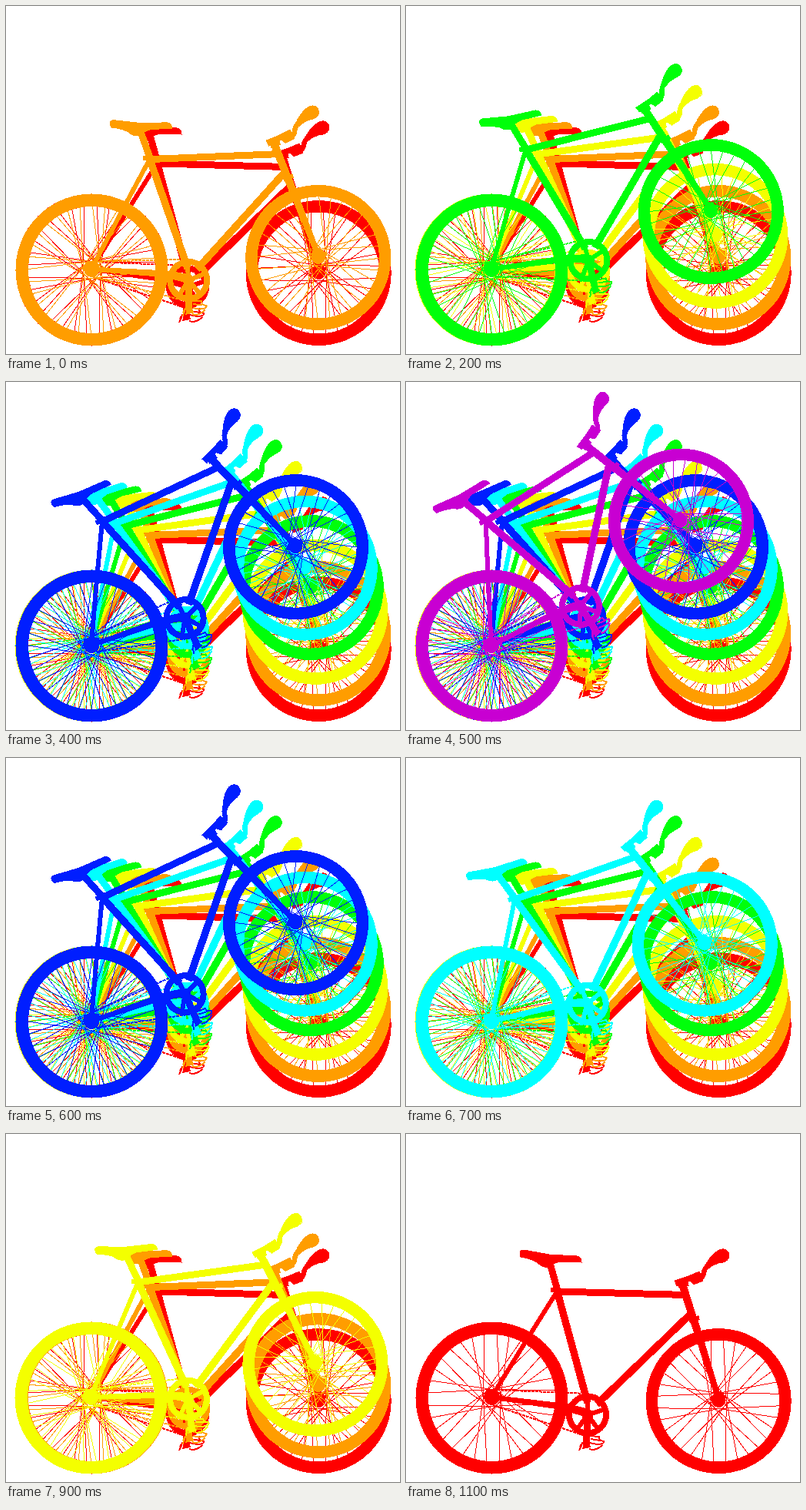
An HTML page for the animation above (1.2 s loop, 512x453 px).

```html
<!DOCTYPE html>
<html lang="en">
<head>
<meta charset="utf-8">
<title>Rainbow wheelie</title>
<style>
  html, body { margin: 0; width: 100%; height: 100%; overflow: hidden; background: #fff; }
  svg { display: block; width: 100%; height: 100%; }
  #bike { fill: none; stroke: currentColor; }
  .solid { fill: currentColor; stroke-width: 1; }
</style>
</head>
<body>
<svg viewBox="0 0 512 453" shape-rendering="crispEdges">
  <defs>
    <g id="bike">
      <g id="wheels"></g>

      <!-- saddle and seat post -->
      <path class="solid" d="M148 155Q148 151 153 151L186 157L222 159Q228 160 228 167L201 166Q191 168 188 172Q181 175 175 171Q167 163 149 160Z"/>
      <path stroke-width="9" d="M187 168L197 204"/>
      <path stroke-width="6" d="M188 203L203 204"/>

      <!-- frame -->
      <path stroke-width="9.5" d="M196 203L236 350M369 235L248 352"/>
      <path stroke-width="9" d="M197 205L364 209.5"/>
      <path stroke-width="6" d="M195 207L160 263L112 341"/>
      <path class="solid" d="M111 340L212 352L236 358V369L205 359L111 345Z"/>

      <!-- head tube and fork -->
      <path stroke-width="10" d="M359 195L374 243"/>
      <path stroke-width="6" d="M354 198L367 195M368 243L381 239"/>
      <path class="solid" d="M369 242L378 239L410 346L404 348Z"/>

      <!-- stem, bar and grip -->
      <path class="solid" d="M349 191L367 185L381 179L386 191L374 196L369 191L352 198Z"/>
      <path stroke-width="6.5" d="M378 190Q387 187 387 180Q389 172 398 166"/>
      <path class="solid" d="M389 171Q395 159 405 152Q414 147 419 154Q422 164 412 167Q401 168 392 176Z"/>

      <!-- chain -->
      <path stroke-width="2" stroke-dasharray="4 1" d="M113 333L236 338M113 353L230 392"/>

      <!-- chainring, crank and pedal -->
      <circle cx="236" cy="365.5" r="24" stroke-width="8"/>
      <circle class="solid" cx="236" cy="365.5" r="7"/>
      <g id="arms" stroke-width="6"></g>
      <path stroke-width="9" d="M236 366L234 408"/>
      <path stroke-width="2" d="M225 412L230 401L226 407M238 393L251 394Q250 399 257 400Q258 404 248 404L239 402M240 397L252 399M229 409L240 407M238 410Q247 413 255 405"/>
    </g>
  </defs>
  <g id="trail"></g>
</svg>
<script>
const NS = 'http://www.w3.org/2000/svg';
const STEP_MS = 100;
const PIVOT = { x: 111.5, y: 343.5 };

// Each bike leans further back than the one painted before it.
const POSES = [
  { color: '#ff0000', angle: 0 },
  { color: '#ff9d00', angle: -3.9 },
  { color: '#f4ff00', angle: -9.4, shift: -1 },
  { color: '#00ff0a', angle: -15.7 },
  { color: '#00ffff', angle: -20.9 },
  { color: '#001eff', angle: -26.7 },
  { color: '#c800d2', angle: -34.2 }
];

function add(parent, name, attrs) {
  const node = document.createElementNS(NS, name);
  for (const key in attrs) node.setAttribute(key, attrs[key]);
  return parent.appendChild(node);
}

const byId = id => document.getElementById(id);

function polar(cx, cy, r, degrees) {
  const a = degrees * Math.PI / 180;
  return `${(cx + r * Math.cos(a)).toFixed(2)} ${(cy + r * Math.sin(a)).toFixed(2)}`;
}

function wheel(cx, cy, outer, inner, hub) {
  const group = byId('wheels');
  const count = 32;
  add(group, 'circle', { cx, cy, r: (outer + inner) / 2, 'stroke-width': outer - inner });
  let spokes = '';
  for (let i = 0; i < count; i++) {
    const angle = (i + 0.4) * 360 / count;
    const lean = i % 4 < 2 ? 78 : -78;
    spokes += `M${polar(cx, cy, hub, angle + lean)}L${polar(cx, cy, inner + 1, angle)}`;
  }
  add(group, 'path', { d: spokes, 'stroke-width': 1 });
  add(group, 'circle', { class: 'solid', cx, cy: cy - 1, r: hub - 1 });
}

wheel(PIVOT.x, PIVOT.y, 99, 82.5, 11);
wheel(406.2, 347.5, 94.5, 79, 10);

for (let i = 0; i < 5; i++) {
  add(byId('arms'), 'path', { d: `M236 365.5L${polar(236, 365.5, 24, i * 72 - 90)}` });
}

const bikes = POSES.map(({ color, angle, shift = 0 }) => add(byId('trail'), 'use', {
  href: '#bike',
  color,
  transform: `translate(${shift} 0) rotate(${angle} ${PIVOT.x} ${PIVOT.y})`
}));

// The trail grows to the last bike, then shrinks back to the first.
function draw(ms) {
  const top = POSES.length - 1;
  const step = Math.floor(ms / STEP_MS) % (2 * top);
  const last = top - Math.abs(step + 1 - top);
  bikes.forEach((bike, i) => bike.setAttribute('visibility', i <= last ? 'visible' : 'hidden'));
}

const start = performance.now();
function tick() {
  draw(performance.now() - start);
  requestAnimationFrame(tick);
}
tick();
</script>
</body>
</html>
```
